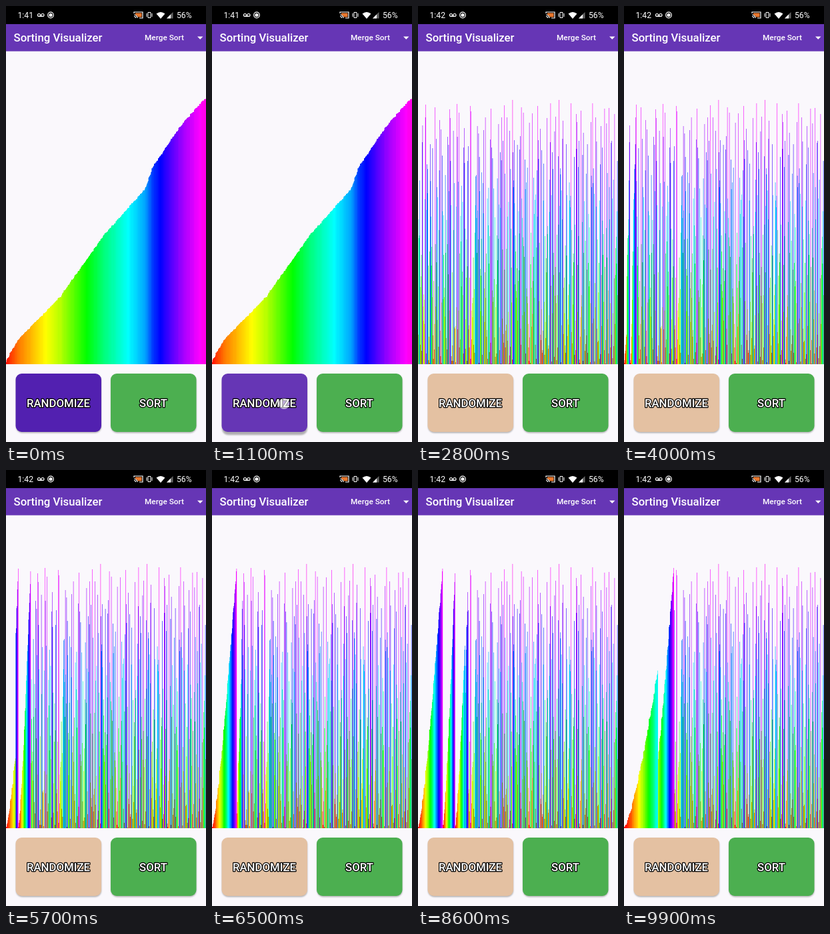
An HTML page with a canvas that plays this animation: 300x650 px, repeating every 10 s.

```html
<!DOCTYPE html>
<html lang="en">
<head>
<meta charset="utf-8">
<title>Sorting Visualizer</title>
<style>
html, body { margin: 0; width: 300px; height: 650px; overflow: hidden; background: #faf8fc; }
canvas, svg { position: absolute; left: 0; top: 0; }
text { font-family: Roboto, "Noto Sans", sans-serif; font-weight: 500; fill: #fff; }
.label { font-size: 16.8px; text-anchor: middle; stroke: #000; stroke-width: 2.4px; stroke-linejoin: round; paint-order: stroke; }
.status { font-size: 12.2px; font-weight: 400; }
</style>
</head>
<body>
<canvas id="chart" width="300" height="650"></canvas>
<svg width="300" height="650" viewBox="0 0 300 650">
  <rect width="300" height="27"/>
  <rect y="27" width="300" height="40.5" fill="#6636b5"/>

  <text class="status" id="clock" x="17.5" y="17.5">1:41</text>
  <g fill="none" stroke="#fff" stroke-width="1.2">
    <circle cx="49.5" cy="13.5" r="2"/><circle cx="55" cy="13.5" r="2"/><path d="M49.5 15.5H55"/>
    <circle cx="67" cy="13.5" r="4.3"/>
    <path d="M192 11V9h13v9h-5M192 13a5 5 0 0 1 5 5M192 15.5a2.5 2.5 0 0 1 2.5 2.5"/>
    <path d="M213 9.5h4v8h-4zM211 11v5M219 11v5" stroke-width="1"/>
  </g>
  <path d="M194 10.5h9.5v6H198q-1-3-4-3.5z" fill="#e8762c"/>
  <circle cx="67" cy="13.5" r="2.6" fill="#fff"/>
  <path d="M225.5 11.5q6.5-5 13 0l-6.5 7.5z" fill="#fff"/>
  <path d="M241 18.5L250.5 9v9.5z" fill="#666"/>
  <path d="M241 18.5l6-6v6z" fill="#fff"/>
  <text class="status" x="256" y="17.5">56%</text>

  <text x="11.5" y="53" font-size="16.8">Sorting Visualizer</text>
  <text x="208" y="51.3" font-size="11.8">Merge Sort</text>
  <path d="M287 45.5h8.5l-4.25 4.2z" fill="#fff"/>

  <defs><filter id="blur" x="-20%" y="-20%" width="140%" height="150%"><feGaussianBlur stdDeviation="1.3"/></filter></defs>
  <g fill="#000" opacity=".3" filter="url(#blur)">
    <rect id="randomShade" x="15" width="128" height="87" rx="9"/>
    <rect id="sortShade" x="157.5" width="128" height="87" rx="9"/>
  </g>
  <rect id="random" x="14.5" y="548" width="128.5" height="87" rx="9"/>
  <rect id="sort" x="157" y="548" width="128.5" height="87" rx="9"/>
  <text class="label" x="78.5" y="597.5">RANDOMIZE</text>
  <text class="label" x="221" y="597.5">SORT</text>
  <circle id="touch" cy="593" r="8" fill="#fff" opacity=".6"/>
</svg>
<script>
const N = 500, BAR = 300 / N, BASE = 533, TALLEST = 396, LOOP = 10000;
const PRESS = 1000, SHUFFLE = 1300, SORT_PRESS = 2400, SORT_ON = 2600;
const SORT_START = 2908, WRITES_PER_MS = 0.119;
const $ = id => document.getElementById(id);
const set = (id, name, value) => $(id).setAttribute(name, value);
const ctx = $("chart").getContext("2d");

let seed = 7;
function rand() {
  seed = (seed * 1664525 + 1013904223) % 4294967296;
  return seed / 4294967296;
}

// Height of the sorted skyline at column x, through a few bends.
const bends = [[0, 0], [20, 36], [80, 96], [150, 193], [210, 260], [222, 293], [260, 350], [300, 395]];
function skyline(x) {
  const i = Math.max(1, bends.findIndex(b => b[0] >= x));
  const [x0, y0] = bends[i - 1], [x1, y1] = bends[i];
  return y0 + (y1 - y0) * (x - x0) / (x1 - x0);
}
const ordered = Array.from({ length: N }, (_, i) => skyline(Math.min(300, i * BAR + rand() * 4)))
  .sort((a, b) => a - b);

// Each sixteenth holds an even spread of heights in random order.
const mixed = [];
for (let b = 0; b < 16; b++) {
  const from = N * b >> 4, size = (N * (b + 1) >> 4) - from;
  const block = Array.from({ length: size }, (_, k) => TALLEST * ((k + rand()) / size) ** 1.35);
  for (let k = size - 1; k > 0; k--) {
    const j = Math.floor(rand() * (k + 1));
    [block[k], block[j]] = [block[j], block[k]];
  }
  mixed.push(...block);
}

// Record each write of the merge sort.
const writes = [];
function mergeSort(a, lo, hi) {
  if (hi - lo < 2) return;
  const mid = (lo + hi) >> 1;
  mergeSort(a, lo, mid);
  mergeSort(a, mid, hi);
  const left = a.slice(lo, mid), right = a.slice(mid, hi);
  for (let k = lo, i = 0, j = 0; k < hi; k++) {
    a[k] = j >= right.length || left[i] <= right[j] ? left[i++] : right[j++];
    writes.push([k, a[k]]);
  }
}
mergeSort(mixed.slice(), 0, N);

function heightsAt(t) {
  if (t < SHUFFLE) return ordered;
  const a = mixed.slice();
  const count = Math.max(0, Math.round((t - SORT_START) * WRITES_PER_MS));
  for (const [k, h] of writes.slice(0, count)) a[k] = h;
  return a;
}

// Adding the colours lets bars that share a pixel blend by their coverage.
ctx.globalCompositeOperation = "lighter";
function drawBars(heights) {
  ctx.clearRect(0, 0, 300, 650);
  heights.forEach((height, i) => {
    const h = Math.round(height);
    ctx.fillStyle = `hsl(${height * .775} 100% 50%)`;
    ctx.fillRect(i * BAR, BASE - h, BAR, h + 1);
  });
}

function draw(t) {
  drawBars(heightsAt(t));
  const pressed = t >= PRESS && t < SHUFFLE;
  const sorting = t >= SORT_PRESS && t < SORT_ON;
  $("clock").textContent = t < SHUFFLE ? "1:41" : "1:42";
  set("random", "fill", t >= SORT_ON ? "#e4c1a2" : pressed ? "#6636b5" : "#5220b0");
  set("sort", "fill", sorting ? "#62b966" : "#4caf50");
  set("randomShade", "y", pressed ? 552.5 : 549.5);
  set("sortShade", "y", sorting ? 552.5 : 549.5);
  set("touch", "cx", sorting ? 230 : 108);
  set("touch", "visibility", pressed || sorting ? "visible" : "hidden");
}

const start = performance.now();
function tick() {
  const t = (performance.now() - start) % LOOP;
  draw(Math.floor(t / 100) * 100);
  requestAnimationFrame(tick);
}
tick();
</script>
</body>
</html>
```
